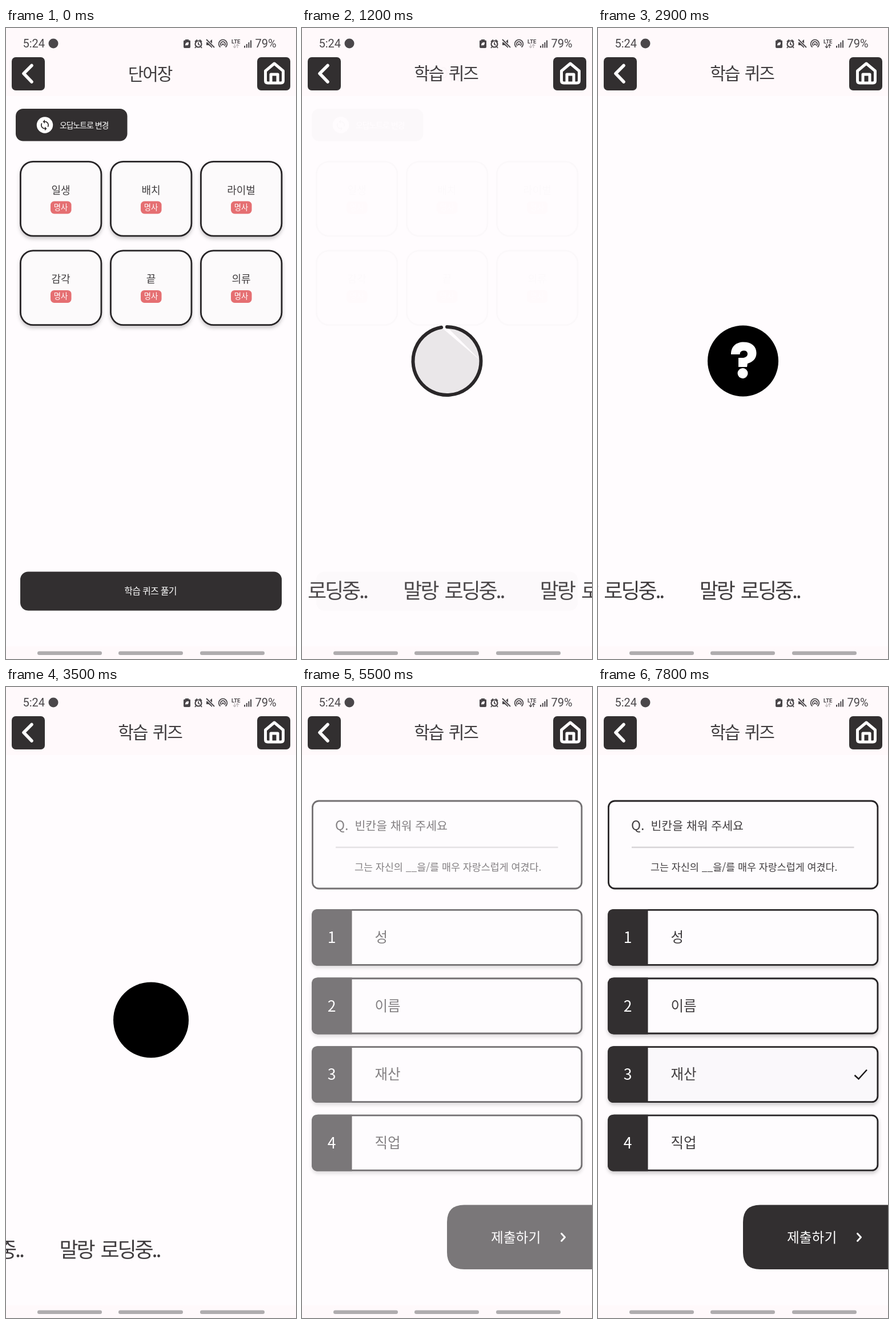
Recreate the animation shown at these times as an HTML page. Size 508 px wide and 1102 px high, loop 8 s.

```html
<!DOCTYPE html>
<html lang="ko">
<head>
<meta charset="utf-8">
<title>학습 퀴즈</title>
<style>
html, body { margin: 0; width: 100%; height: 100%; overflow: hidden; background: #fffcfe; }
svg { display: block; width: 100%; height: 100%; }
text { font-family: "Noto Sans CJK KR", "Noto Sans CJK", "Noto Sans CJK JP", sans-serif; fill: #403d3f; }
.sys text { font-family: Roboto, sans-serif; fill: #4a474a; }
.mid { text-anchor: middle; }
text.inv { fill: #fff; }
.dark { fill: #322f30; }
.box { fill: #fefcfe; stroke: #272426; stroke-width: 2.8; }
.line { fill: none; stroke: #fff; stroke-linecap: round; stroke-linejoin: round; }
.thin { fill: none; stroke: #4a474a; stroke-width: 1.8; }
.shadow { filter: drop-shadow(0 4px 3px rgba(0, 0, 0, .2)); }
.title { font-size: 30px; font-weight: 300; letter-spacing: -2.1px; word-spacing: 3px; }
#marquee { font-size: 36px; font-weight: 300; letter-spacing: -3.1px; word-spacing: 5px; }
</style>
</head>
<body>
<svg viewBox="0 0 508 1102">
  <rect width="508" height="1102" fill="#fffcfe"/>
  <rect width="508" height="119" fill="#fff9fb"/>
  <rect y="1080" width="508" height="22" fill="#fff9fb"/>

  <g class="sys" fill="#4a474a">
    <text x="29.5" y="34" font-size="20">5:24</text>
    <circle cx="83" cy="27" r="8.5"/>
    <path d="M314 21.5V20h6v1.500h1.500q1.500 0 1.500 1.500V33q0 2-2 2h-8q-2 0-2-2V23q0-1.500 1.500-1.500z"/>
    <path d="M314 31c0-5 2-6 6-6c0 5-2 6-5 5z" fill="#fff9fb"/>
    <circle class="thin" cx="337" cy="28" r="5.500" style="stroke-width:2.200"/>
    <path class="thin" d="M331 24l4-3.500M343 24l-4-3.500M332.500 33l-1.500 2M341.500 33l1.500 2M337 25v3.500l2.500 1.500"/>
    <path d="M351 25h4l6-5v15l-6-5h-4z"/>
    <path d="M351 20l14 14" stroke="#fff9fb" stroke-width="4"/>
    <path class="thin" d="M351 20l14 14"/>
    <path class="thin" d="M375.500 33.500a7.300 7.300 0 1 1 9 0M377.500 31a4 4 0 1 1 5 0"/>
    <circle cx="380" cy="28.500" r="1.700"/>
    <text x="395" y="27" font-size="9.500" font-weight="700">LTE</text>
    <path id="arrows" class="thin" style="stroke-width:1.300" d="M400.500 28v6M398 32l2.500 2.500l2.500-2.500M405.500 35v-6M403 31l2.500-2.500l2.500 2.500"/>
    <path d="M417 31h2v3.500h-2zM420.700 28h2v6.500h-2zM424.400 25h2v9.500h-2zM428 21.500h2v13h-2z"/>
    <text x="436.500" y="34" font-size="20">79%</text>
  </g>

  <rect class="dark" x="10" y="51" width="58" height="58" rx="7"/>
  <path class="line" d="M45 65.500L31 79.500L45 94" stroke-width="5.500"/>
  <rect class="dark" x="440" y="51" width="58" height="58" rx="7"/>
  <path class="line" d="M454.500 75L470 62L485.500 75V92Q485.500 96 481.500 96H458.500Q454.500 96 454.500 92Z" stroke-width="5"/>
  <path class="line" d="M464 95V81H476V95" stroke-width="5"/>
  <g class="mid title">
    <text id="titleA" x="252" y="90.500">단어장</text>
    <text id="titleB" x="252" y="89.500">학습 퀴즈</text>
  </g>

  <g id="words">
    <rect class="dark" x="17" y="141" width="195.500" height="56.500" rx="13"/>
    <circle cx="68" cy="169.500" r="14.200" fill="#fff"/>
    <path class="dark" transform="translate(57.500 159) scale(.875)" d="M12 4V1L8 5l4 4V6c3.300 0 6 2.700 6 6 0 1-.25 2-.7 2.800l1.460 1.460C19.500 15 20 13.600 20 12c0-4.400-3.600-8-8-8zm0 14c-3.300 0-6-2.700-6-6 0-1 .25-2 .7-2.800L5.240 7.740C4.500 9 4 10.400 4 12c0 4.400 3.600 8 8 8v3l4-4-4-4v3z"/>
    <text class="inv" x="94" y="175" font-size="14" letter-spacing="-1.100">오답노트로 변경</text>
    <g id="cards"></g>
    <g id="start">
      <rect class="dark" x="25" y="949.500" width="458" height="68" rx="14"/>
      <text class="inv mid" x="253" y="989" font-size="16" letter-spacing="-.7" font-weight="500">학습 퀴즈 풀기</text>
    </g>
  </g>

  <g id="loading">
    <g id="outline">
      <path id="fill"/>
      <path id="ring" fill="none" stroke="#1d1a1c" stroke-width="6" stroke-linecap="round"/>
    </g>
    <circle id="disc" cx="254" cy="581.500"/>
    <g id="mark" fill="#fff">
      <path d="M233 570C233 556 242 548.500 255 548.500C269 548.500 277.500 556 277.500 567.500C277.500 577 272 583 262 586L261 592H246V576H253C259 576 262 573 262 569C262 565.500 259.500 563.500 255.500 563.500C251 563.500 248.500 566 248.500 570Z"/>
      <circle cx="253.500" cy="603" r="9"/>
    </g>
    <g id="marquee"></g>
  </g>

  <g id="quiz">
    <rect class="box" x="18.400" y="199" width="471.500" height="153" rx="11"/>
    <text x="58" y="250" font-size="23">Q.</text>
    <text x="92.500" y="249.500" font-size="20.500">빈칸을 채워 주세요</text>
    <path d="M59 280H448.500" stroke="#d6d4d6" stroke-width="2.600"/>
    <text x="92" y="320.500" font-size="17.400">그는 자신의 __을/를 매우 자랑스럽게 여겼다.</text>
    <g id="options"></g>
    <path id="check" d="M449.500 678L456.500 684.500L471 668.500" fill="none" stroke="#1b191a" stroke-width="2.500"/>
    <path class="dark" d="M508 904.500H284Q254 904.500 254 934.500V987Q254 1017 284 1017H508Z"/>
    <text class="inv" x="331" y="970" font-size="23.700" font-weight="500">제출하기</text>
    <path class="line" d="M454.500 954.500L460.500 961L454.500 967.500" stroke-width="3"/>
  </g>

  <g fill="#afacae">
    <rect x="55" y="1088.500" width="113" height="6.500" rx="3.200"/>
    <rect x="197" y="1088.500" width="113" height="6.500" rx="3.200"/>
    <rect x="340" y="1088.500" width="113" height="6.500" rx="3.200"/>
  </g>
</svg>
<script>
const $ = id => document.getElementById(id);
const LOOP = 8000, CX = 254, CY = 581.5, R = 59.5;

$('cards').innerHTML = ['일생', '배치', '라이벌', '감각', '끝', '의류'].map((word, i) => `
  <g transform="translate(${i % 3 * 158} ${Math.floor(i / 3) * 155.4})">
    <rect class="box shadow" x="25.4" y="233.4" width="141.5" height="129.8" rx="22" style="fill:#fcfafb"/>
    <text class="mid" x="96" y="290" font-size="18">${word}</text>
    <rect x="78" y="302.5" width="36.5" height="22" rx="6.5" fill="#e56f72"/>
    <text class="inv mid" x="96" y="318" font-size="13.3">명사</text>
  </g>`).join('');

$('options').innerHTML = ['성', '이름', '재산', '직업'].map((word, i) => `
  <g transform="translate(0 ${i * 119.6})">
    <rect class="box shadow" id="opt${i + 1}" x="18.4" y="389.4" width="471.5" height="96" rx="10"/>
    <path class="dark" d="M87.5 388H28Q17 388 17 399V476Q17 486.8 28 486.8H87.5Z"/>
    <text class="inv mid" x="52" y="447" font-size="26.5">${i + 1}</text>
    <text x="127.5" y="446" font-size="24.5">${word}</text>
  </g>`).join('');

// Four copies, a wide gap, then the next round of the ticker
$('marquee').innerHTML = [-718.5, -479, -239.5, 0, 412, 651.5]
  .map(x => `<text x="${x - 2}" y="996">말랑 로딩중..</text>`).join('');

const ramp = (t, a, b) => Math.min(1, Math.max(0, (t - a) / (b - a)));
const ease = (t, a, b) => { const u = ramp(t, a, b); return u * u * (3 - 2 * u); };
const show = (id, alpha) => {
  $(id).style.opacity = alpha;
  $(id).style.display = alpha > 0 ? '' : 'none';
};
const point = turn => {
  const a = (turn - .25) * 2 * Math.PI;
  return `${CX + R * Math.cos(a)} ${CY + R * Math.sin(a)}`;
};
const arc = (from, to) =>
  `M${point(from)}A${R} ${R} 0 ${to - from > .5 ? 1 : 0} 1 ${point(to)}`;

function drawSpinner(ms) {
  const turn = Math.min(.9999, ease(ms, 0, 300));
  const ink = ramp(ms, 250, 480);
  const bump = Math.abs(ms - 520) < 100 ? Math.cos((ms - 520) / 200 * Math.PI) ** 2 : 0;
  // The outline is split at three o'clock, so each piece closes with its own chord
  const pieces = turn > .25 ? arc(0, .25) + 'Z' + arc(.25, turn) + 'Z' : arc(0, turn) + 'Z';
  $('ring').setAttribute('d', arc(0, turn));
  $('fill').setAttribute('d', pieces);
  $('fill').setAttribute('fill-opacity', Math.max(.08, ink));
  $('disc').setAttribute('r', 62 + 4 * bump);
  show('outline', ink < 1 ? 1 : 0);
  show('disc', ink < 1 ? 0 : 1);
  const pop = ease(ms, 800, 1150);
  show('mark', pop);
  $('mark').setAttribute('transform', `translate(${CX} ${CY}) scale(${pop}) translate(${-CX} ${-CY})`);
}

function draw(t) {
  const leave = ease(t, 700, 1243);
  show('words', 1 - leave);
  show('titleA', 1 - leave);
  show('titleB', leave);
  $('start').style.opacity = 1 - .3 * ramp(t, 600, 750);

  show('loading', ease(t, 850, 1260) * (1 - ease(t, 5030, 5300)));
  drawSpinner(Math.max(0, t - 930) % 2050);
  $('marquee').setAttribute('transform', `translate(${419 - .1406 * (t - 1200)} 0)`);

  show('quiz', ease(t, 5050, 5800));
  const picked = t >= 7500;
  $('opt3').style.fill = picked ? '#faf8fb' : '';
  show('check', picked ? ramp(t, 7400, 7800) : 0);

  const busy = t >= 1300 && t < 6500 && !(t >= 3300 && t < 3800) || t >= 7500 && t < 7600;
  $('arrows').style.opacity = busy ? 1 : .35;
}

function tick() {
  draw(performance.now() % LOOP);
  requestAnimationFrame(tick);
}
tick();
</script>
</body>
</html>
```
